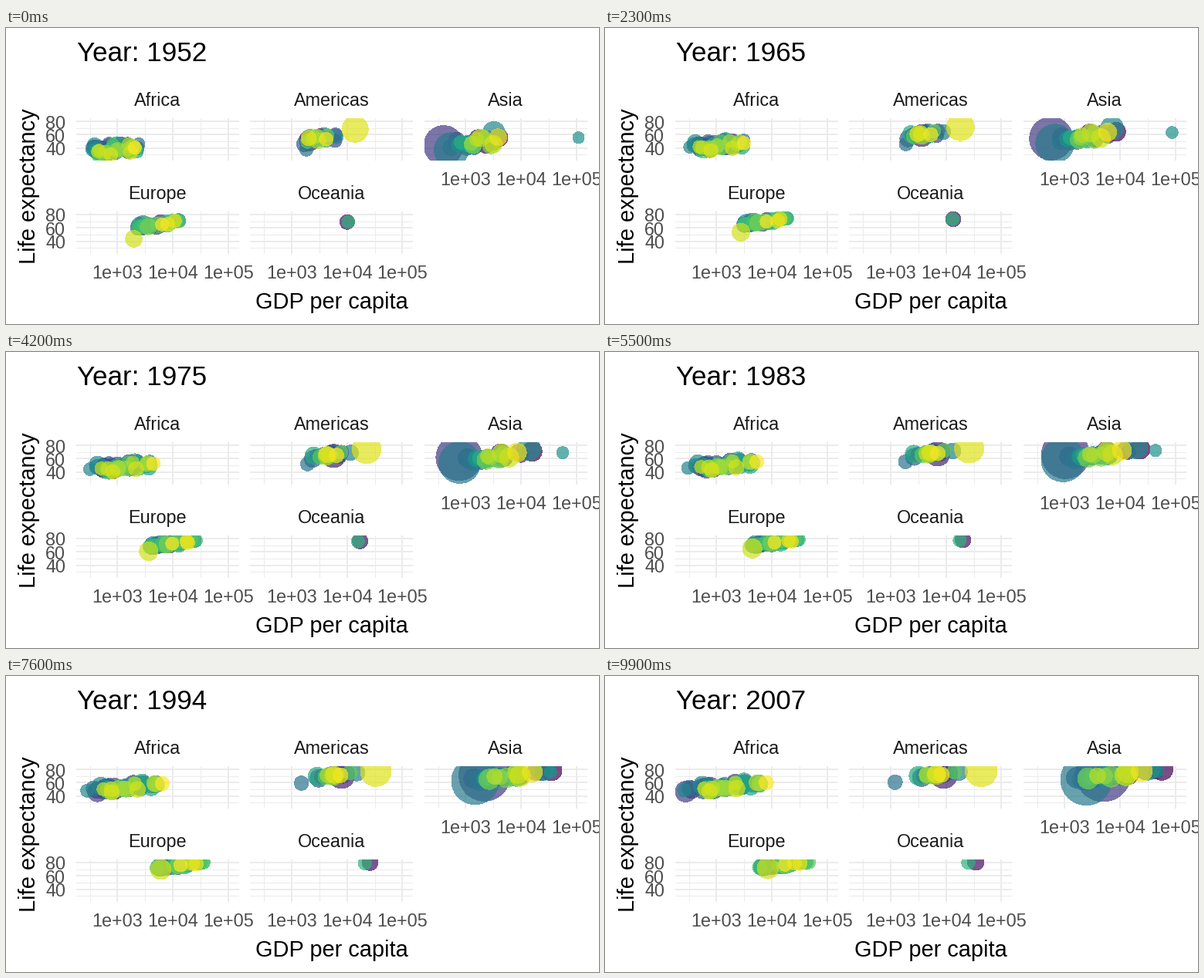
Write a matplotlib script that moves like this. It is 768 px wide and 384 px high and loops after 10 s.

```python
import numpy as np
import matplotlib.pyplot as plt
from matplotlib.animation import FuncAnimation

W, H, DPI = 768, 384, 192
FRAMES, INTERVAL = 100, 100
FIRST, LAST = 1952, 2007
PX = 72 / DPI                       # points per pixel
COUNTRIES = 142
MAX_POP = 1318.7                    # millions

# Panel geometry in pixels, ranges in data units
LEFT, TOP, PW, PH = 90.5, 116.6, 211, 55.6
STEP_X, STEP_Y = 225.5, 120.9
X_LIM, Y_LIM = (2.2487, 5.1887), (20.649, 85.553)

TITLE, AXIS, SMALL = 35 * PX, 29 * PX, 23.4 * PX    # font sizes
GREY, DARK, GRID = "#4D4D4D", "#1A1A1A", "#EBEBEB"

T = np.linspace(0, 1, FRAMES)
RISE = np.sin(np.pi * T / 2)        # life expectancy gains slow down
rng = np.random.default_rng(11)


def track(keys):
    """Evenly spaced keys spread over the whole run."""
    return np.interp(T, np.linspace(0, 1, len(keys)), keys)


def bubble(rank, pop, gdp, life):
    """Paths of one country; rank sets its colour and stacking."""
    y = life[0] + (life[1] - life[0]) * RISE
    return rank, track(np.log10(gdp)), y, track(np.sqrt(pop))


def crowd(ranks, start, end, life, pop, growth):
    """Countries scattered about a regional trend in log GDP."""
    for rank in ranks:
        a, b, c, d, e = rng.uniform(-1.7, 1.7, 5)
        dx = start[1] * a, end[1] * (.8 * a + .5 * b)
        x = start[0] + dx[0], end[0] + dx[1]
        mid = sum(x) / 2 + .06 + .05 * d
        y = [min(m + 9 * k + .12 * (82 - m) * c, 82) for m, k in zip(life, dx)]
        p = pop * np.exp(.75 * e)
        yield bubble(rank, (p, p * growth), 10 ** np.array([x[0], mid, x[1]]), y)


# Countries that stand out: population in millions, GDP per capita, life
LANDMARKS = {
    "Africa": [bubble(27, (14, 64.6), (781, 730, 278), (39, 46.5))],
    "Americas": [bubble(14, (56.6, 190), (2109, 6850, 9066), (51, 72.4)),
                 bubble(53, (3.2, 8.5), (1840, 1950, 1202), (37.6, 60.9)),
                 bubble(134, (158, 301), (13990, 42952), (68.4, 78.2))],
    "Asia": [bubble(24, (556, 1319), (400, 850, 4959), (44, 73)),
             bubble(58, (372, 1110), (547, 830, 2452), (37, 64.7)),
             bubble(66, (86, 127), (3217, 17900, 31656), (63, 82.6)),
             bubble(71, (.16, 2.5), (108382, 85000, 47000, 33000, 47307),
                    (55.6, 77.6))],
    "Europe": [bubble(131, (22, 71), (1969, 8458), (43.6, 71.8))],
    "Oceania": [bubble(5, (8.7, 20.4), (10040, 18900, 34435), (69, 81.2)),
                bubble(91, (2, 4.1), (10557, 16900, 25185), (69.4, 80.2))],
}

# Size of each crowd, log GDP (mean, spread) at start and end, mean life at
# start and end, typical population and its growth factor
CROWDS = {
    "Africa": (51, (2.97, .26), (3.22, .38), (39, 55), 3.2, 3.3),
    "Americas": (22, (3.5, .2), (3.85, .23), (54, 72.5), 5, 2.5),
    "Asia": (29, (3.15, .27), (3.8, .45), (48, 71), 9, 2.8),
    "Europe": (29, (3.72, .24), (4.25, .26), (65.5, 77.5), 9, 1.25),
}

taken = {b[0] for group in LANDMARKS.values() for b in group}
spare = rng.permutation([r for r in range(COUNTRIES) if r not in taken])


def population(name):
    """All bubbles of a panel in stacking order."""
    global spare
    group = list(LANDMARKS[name])
    if name in CROWDS:
        n, *trend = CROWDS[name]
        ranks, spare = spare[:n], spare[n:]
        group += crowd(ranks, *trend)
    return sorted(group, key=lambda b: b[0])


plt.rcParams["font.family"] = "Liberation Sans"
fig = plt.figure(figsize=(W / DPI, H / DPI), dpi=DPI, facecolor="white")


def label(x, y, s, size, color="black", ha="center", **kw):
    """Text with its baseline at pixel (x, y) from the top left."""
    return fig.text(x / W, 1 - y / H, s, fontsize=size, color=color, ha=ha,
                    va="baseline", **kw)


def grid(ax, xs, ys, width):
    for x in xs:
        ax.axvline(x, color=GRID, lw=width * PX, zorder=width / 10)
    for y in ys:
        ax.axhline(y, color=GRID, lw=width * PX, zorder=width / 10)


def panel(name, col, row):
    left, top = LEFT + col * STEP_X, TOP + row * STEP_Y
    ax = fig.add_axes([left / W, 1 - (top + PH) / H, PW / W, PH / H])
    ax.set(xlim=X_LIM, ylim=Y_LIM)
    ax.axis("off")
    grid(ax, (2.5, 3.5, 4.5), (30, 50, 70), 1)
    grid(ax, (3, 4, 5), (40, 60, 80), 2)
    label(left + PW / 2, top - 15.4, name, SMALL, DARK)
    if col == 0:
        for v in (40, 60, 80):
            y = top + (Y_LIM[1] - v) / (Y_LIM[1] - Y_LIM[0]) * PH
            label(77.3, y + 9.2, str(v), SMALL, GREY, ha="right")
    if row == 1 or col == 2:
        for e in (3, 4, 5):
            x = left + (e - X_LIM[0]) / (X_LIM[1] - X_LIM[0]) * PW
            label(x, top + PH + 31.8, f"1e+0{e}", SMALL, GREY)
    return ax


layers = []
for i, name in enumerate(LANDMARKS):
    # the upper row holds three panels, the lower one two
    ax = panel(name, i % 3, i // 3)
    ranks, *paths = zip(*population(name))
    x, y, root = (np.array(p) for p in paths)
    mm = 2 + 10 * root / np.sqrt(MAX_POP)
    area = (.75 * (mm * 72.27 / 25.4 + .945) + PX) ** 2
    colors = plt.cm.viridis(np.array(ranks) / (COUNTRIES - 1))
    dots = ax.scatter(x[:, 0], y[:, 0], s=area[:, 0], c=colors, alpha=.7,
                      linewidths=0, antialiaseds=False, zorder=2)
    layers.append((dots, x, y, area))

title = label(LEFT + 1, 43, "", TITLE, ha="left")
label(LEFT + STEP_X + PW / 2, 364, "GDP per capita", AXIS)
label(38, TOP + (STEP_Y + PH) / 2, "Life expectancy", AXIS, rotation=90,
      rotation_mode="anchor")


def update(i):
    title.set_text(f"Year: {round(FIRST + (LAST - FIRST) * T[i])}")
    for dots, x, y, area in layers:
        dots.set_offsets(np.column_stack([x[:, i], y[:, i]]))
        dots.set_sizes(area[:, i], DPI)
    return [title] + [layer[0] for layer in layers]


anim = FuncAnimation(fig, update, frames=FRAMES, interval=INTERVAL,
                     repeat=True, repeat_delay=0, blit=False)
plt.show()
```
